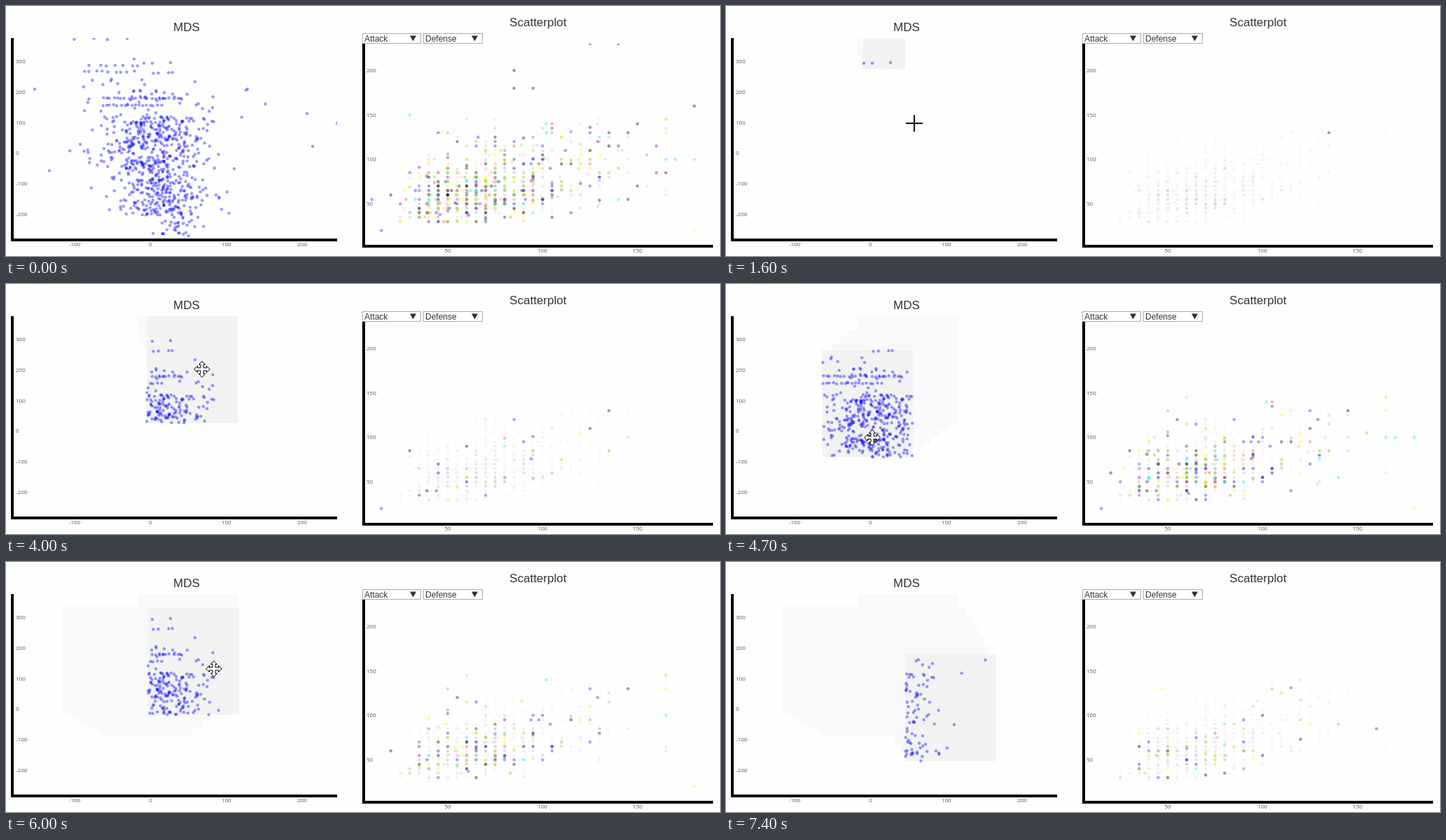
Recreate the animation shown at these times as an HTML page with a canvas. Size 1020 px wide and 358 px high, loop 8.1 s.

```html
<!DOCTYPE html>
<html lang="en">
<head>
<meta charset="utf-8">
<title>Linked brushing</title>
<style>
  html, body { margin: 0; width: 100%; height: 100%; overflow: hidden; background: #fefefe; }
  canvas, svg { position: absolute; left: 0; top: 0; width: 1020px; height: 358px; }
  .title { font: 17px "Liberation Sans", Arial, sans-serif; fill: #333; }
  .menu { font: 12px "Liberation Sans", Arial, sans-serif; fill: #333; }
  .tick { font: 8px "Open Sans", sans-serif; fill: #555; }
</style>
</head>
<body>
<canvas id="stage" width="1020" height="358"></canvas>
<svg id="labels" viewBox="0 0 1020 358"></svg>
<script>
const ctx = document.getElementById('stage').getContext('2d');
const labels = document.getElementById('labels');
const LOOP = 8100;

function label(text, x, y, cls, anchor = 'start') {
  const el = document.createElementNS('http://www.w3.org/2000/svg', 'text');
  el.setAttribute('x', x);
  el.setAttribute('y', y);
  el.setAttribute('class', cls);
  el.setAttribute('text-anchor', anchor);
  el.textContent = text;
  labels.appendChild(el);
}

label('MDS', 258, 36, 'title', 'middle');
label('Scatterplot', 760, 29, 'title', 'middle');
label('Attack', 512, 51, 'menu');
label('Defense', 599, 51, 'menu');
for (let i = 0; i < 6; i++) label(300 - i * 100, 14, 82 + i * 43.8, 'tick');
for (let i = 0; i < 4; i++) {
  label(i * 100 - 100, 98 + i * 108.4, 344, 'tick', 'middle');
  label(200 - i * 50, 515, 95 + i * 63.7, 'tick');
  if (i) label(i * 50, 495.5 + i * 135.5, 353, 'tick', 'middle');
}

// Seeded random numbers
let seed = 20177;
function rnd() {
  seed = (seed + 0x6D2B79F5) | 0;
  let v = Math.imul(seed ^ (seed >>> 15), 1 | seed);
  v = (v + Math.imul(v ^ (v >>> 7), 61 | v)) ^ v;
  return ((v ^ (v >>> 14)) >>> 0) / 4294967296;
}
const gauss = () => Math.sqrt(-2 * Math.log(1 - rnd())) * Math.cos(2 * Math.PI * rnd());
const range = (a, b) => a + (b - a) * rnd();

// Left plot: a few landmarks, level rows and bands that are bell-shaped across
function makeCloud() {
  const pts = [[197, 82], [209, 82], [235, 81], [183, 76], [41, 119], [345, 119],
    [430, 154], [473, 168], [438, 201], [62, 236], [326, 233]];
  const row = (y, x0, x1, n) => {
    for (let i = 0; i < n; i++)
      pts.push([x0 + (x1 - x0) * (i + range(-.3, .3)) / (n - 1), y + range(-1, 1)]);
  };
  const band = (n, y0, y1, cx, sx) => {
    for (let i = 0; i < n; i++) pts.push([cx + sx * gauss(), range(y0, y1)]);
  };
  row(47, 98, 168, 4);
  row(85, 121, 190, 7);
  row(94, 110, 183, 9);
  row(96, 209, 240, 4);
  row(132, 138, 250, 22);
  row(142, 138, 221, 17);
  band(52, 104, 160, 208, 56);
  band(350, 158, 232, 208, 42);
  band(70, 225, 250, 210, 34);
  band(210, 248, 300, 224, 32);
  band(32, 300, 330, 240, 18);
  return pts;
}

// Right plot: correlated log-normal values, mostly multiples of five
const [GRAY, CYAN] = ['#111', '#00f0ff'];
const PALE = ['#ffc8d0', '#e0b890', '#d8d0d0', '#f0e0e0'];
const MIX = [GRAY, GRAY, CYAN, '#22f', '#22f', '#ff0', '#ff0', '#90f000', '#e06030',
  '#8000c0', '#a8b800', ...PALE, ...PALE];

function makeScatter() {
  const pts = [];
  const snap = v => rnd() < .8 ? Math.round(v / 5) * 5 : Math.round(v);
  const add = (a, d, color, few = false) =>
    pts.push({ x: 495.5 + 2.71 * a, y: 347 - 1.274 * d, color, few, r: rnd() });
  add(80, 90, CYAN, true);
  add(135, 130, GRAY, true);
  for (const a of [125, 140]) add(a, 230, GRAY);
  for (const d of [200, 180]) add(85, d, GRAY);
  add(95, 180, GRAY);
  add(180, 160, GRAY);
  add(180, 20, '#ff0');
  add(10, 55, '#22f');
  add(15, 20, '#22f');
  for (const a of [165, 170, 180]) add(a, 100, CYAN);
  while (pts.length < 780) {
    const g = gauss(), h = .5 * g + .87 * gauss();
    const a = snap(Math.exp(4.27 + .43 * g)), d = snap(Math.exp(4.19 + .4 * h));
    if (a >= 20 && a < 167 && d >= 29 && d < 155) add(a, d, MIX[Math.floor(rnd() * MIX.length)]);
  }
  return pts;
}

const cloud = makeCloud();
const scatter = makeScatter();

// Key poses: [tick, x, y], one tick is 100 ms
const CORNER = [[9, 188, 46], [14, 195, 46], [23, 201, 46], [40, 201, 46], [45, 137, 95],
  [47, 137, 95], [52, 81, 64], [56, 81, 64], [60, 203, 66], [63, 214, 66], [68, 256, 132]];
const SIZE = [[9, 20, 20], [14, 60, 44], [22, 60, 44], [31, 85, 115], [36, 130, 153]];
const POINTER = [[2, 817, 140], [7, 227, 76], [9, 208, 66], [14, 296, 188], [16, 269, 168],
  [23, 220, 185], [31, 337, 272], [33, 387, 280], [36, 366, 244], [40, 280, 122], [45, 209, 220],
  [47, 209, 220], [52, 159, 150], [56, 159, 150], [60, 297, 153], [63, 300, 155], [68, 350, 215],
  [70, 355, 218], [73, 1003, 312]];
const HELD = [8, 15, 22, 34, 46, 55, 57, 58, 64, 69];

function pose(keys, k) {
  const n = keys.findIndex(key => key[0] >= k);
  if (n < 1) return keys[n ? keys.length - 1 : 0].slice(1);
  const [t0, x0, y0] = keys[n - 1], [t1, x1, y1] = keys[n];
  const u = (k - t0) / (t1 - t0);
  return [x0 + (x1 - x0) * u, y0 + (y1 - y0) * u];
}
const brush = k => [...pose(CORNER, k), ...pose(SIZE, k)].map(Math.round);

// The right plot refreshes only when a brush gesture pauses
function chosen(p, k) {
  if (k < 16) return true;
  if (k < 37) return p.few;
  if (k < 47) return p.few || p.r < .05;
  if (k < 56) return p.r < .45 && p.y > 150;
  if (k < 62) return p.r > .2 && p.r < .48 && p.y > 140;
  if (k < 70) return p.r < .3;
  return p.r > .5 && p.r < .6;
}

function dot(x, y) {
  ctx.beginPath();
  ctx.arc(x, y, 2.2, 0, 2 * Math.PI);
  ctx.fill();
}

function clipped(x, y, w, h, draw) {
  ctx.save();
  ctx.beginPath();
  ctx.rect(x, y, w, h);
  ctx.clip();
  draw();
  ctx.restore();
}

function drawCloud(k) {
  const active = k >= 9;
  const [bx, by, bw, bh] = brush(k);
  if (active) {
    ctx.fillStyle = '#f9f9fb';
    for (let j = 9; j < k; j++) ctx.fillRect(...brush(j));
    ctx.fillStyle = '#f2f2f2';
    ctx.fillRect(bx, by, bw, bh);
  }
  ctx.fillStyle = 'rgba(0,0,255,.4)';
  for (const [x, y] of cloud) {
    const inside = x >= bx && x <= bx + bw && y >= by && y <= by + bh;
    if (!active || inside) dot(x, y);
  }
}

function drawScatter(k) {
  for (const p of scatter) {
    const on = chosen(p, k);
    ctx.globalAlpha = on ? .42 : .02;
    ctx.fillStyle = on ? p.color : '#000';
    dot(p.x, p.y);
  }
}

function drawMenu(x, w) {
  ctx.fillStyle = '#fff';
  ctx.fillRect(x, 39, w, 15);
  ctx.strokeStyle = '#a9a9a9';
  ctx.lineWidth = 1;
  ctx.strokeRect(x + .5, 39.5, w - 1, 14);
  ctx.fillStyle = '#333';
  ctx.beginPath();
  ctx.moveTo(x + w - 16, 42.5);
  ctx.lineTo(x + w - 7, 42.5);
  ctx.lineTo(x + w - 11.5, 50.5);
  ctx.fill();
}

function drawAxes(x, y, w, h) {
  ctx.fillStyle = '#000';
  ctx.fillRect(x, y, 4, h);
  ctx.fillRect(x, y + h - 4, w, 4);
}

function outline(list) {
  ctx.beginPath();
  for (const [x, y] of list) ctx.lineTo(x, y);
  ctx.closePath();
  ctx.fillStyle = '#fff';
  ctx.fill();
  ctx.strokeStyle = '#000';
  ctx.lineWidth = 1;
  ctx.stroke();
}

function drawPointer(k) {
  if (k < 2 || k > 73) return;
  const [x, y] = pose(POINTER, k).map(Math.round);
  ctx.save();
  ctx.translate(x, y);
  if (x > 473) {
    outline([[0, 0], [0, 16], [4, 12.5], [6.5, 18], [9, 17], [6.5, 11.5], [11.5, 11.5]]);
  } else if (k < 38) {
    ctx.fillStyle = '#000';
    ctx.fillRect(-12, -1, 24, 2);
    ctx.fillRect(-1, -12, 2, 24);
  } else {
    const arm = [[-2, -2], [-2, -6.5], [-4.5, -6.5], [0, -11.5], [4.5, -6.5], [2, -6.5]];
    const shape = [];
    for (let q = 0; q < 4; q++) {
      const c = Math.cos(q * Math.PI / 2), s = Math.sin(q * Math.PI / 2);
      for (const [px, py] of arm) shape.push([px * c - py * s, px * s + py * c]);
    }
    outline(shape);
  }
  ctx.restore();
}

function render(now) {
  let k = Math.min(74, Math.floor((now % LOOP) / 100));
  while (HELD.includes(k)) k--;
  ctx.fillStyle = '#fefefe';
  ctx.fillRect(0, 0, 1020, 358);
  clipped(7, 46, 466, 289, () => drawCloud(k));
  clipped(509, 54, 501, 290, () => drawScatter(k));
  drawAxes(7, 46, 466, 291);
  drawAxes(509, 54, 501, 292);
  drawMenu(509, 84);
  drawMenu(596, 85);
  drawPointer(k);
}

let start;
function tick(now) {
  if (start === undefined) start = now;
  render(now - start);
  requestAnimationFrame(tick);
}
render(0);
requestAnimationFrame(tick);
</script>
</body>
</html>
```
